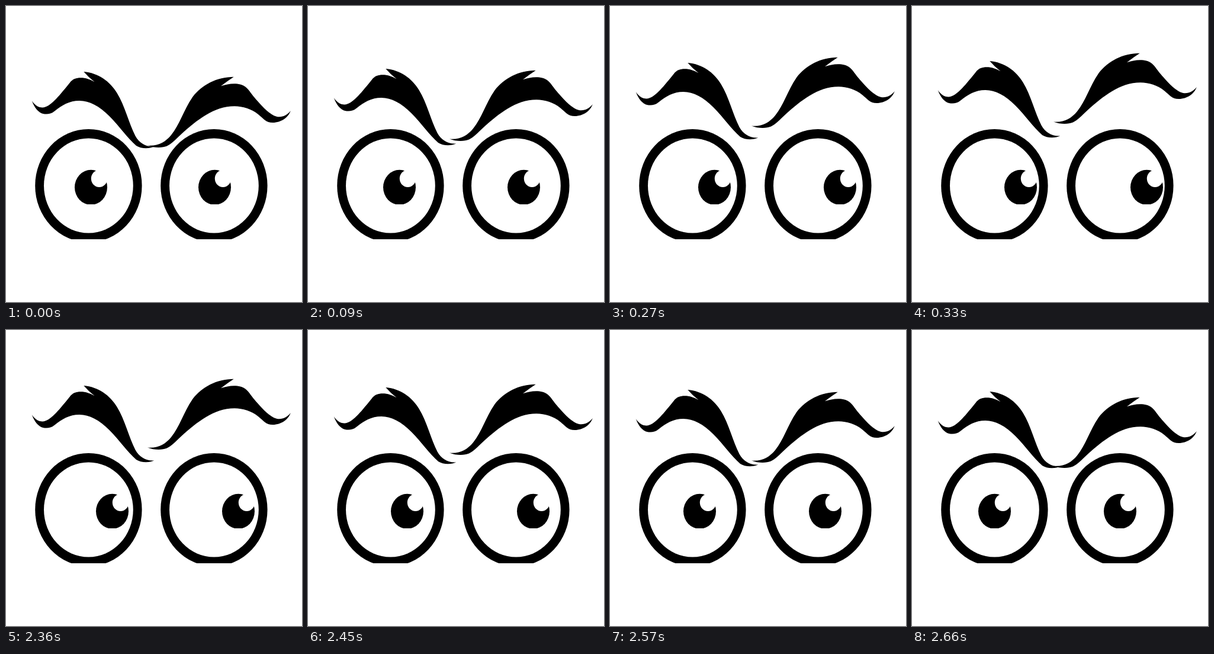
Write an HTML page that moves like this. It is 500 by 500 pixels and loops after 4930 ms.

```html
<!DOCTYPE html>
<html lang="en">
<head>
<meta charset="utf-8">
<title>Shifty eyes</title>
<style>
  html, body { margin: 0; width: 100%; height: 100%; overflow: hidden; background: #fff; }
  svg { display: block; width: 100%; height: 100%; }
</style>
</head>
<body>
<svg viewBox="0 0 500 500">
  <defs>
    <clipPath id="eyeCut"><rect y="200" width="500" height="194"/></clipPath>
    <clipPath id="pupilCut"><rect x="-30" y="270" width="60" height="65"/></clipPath>
    <g id="eye">
      <ellipse cy="303.5" rx="90.2" ry="95.5"/>
      <ellipse cy="303.5" rx="75.4" ry="80" fill="#fff"/>
    </g>
    <g id="pupil" clip-path="url(#pupilCut)">
      <ellipse cy="306.3" rx="27.5" ry="29.5"/>
      <ellipse cx="14" cy="291.5" rx="13.7" ry="14.5" fill="#fff"/>
    </g>
  </defs>
  <rect width="500" height="500" fill="#fff"/>
  <g clip-path="url(#eyeCut)">
    <use href="#eye" x="139.4"/>
    <use href="#eye" x="351.4"/>
  </g>
  <use id="leftPupil" href="#pupil"/>
  <use id="rightPupil" href="#pupil"/>
  <path id="leftBrow" d="M43.7 142C48 149 55 154 62.5 153.5C76.5 152 92.5 130 107.5 112C112.5 105 119 103.3 126 103.3
    C135 103.3 142 106 149.5 110.3Q140 103 131.3 93C155.5 95 175.5 109 187.5 129C201 151 207.5 180 218.5 201.5
    C225 213 236 220.5 250.3 219.5C243 223 228 223.5 220 218C206 206 191.5 185 174.5 168
    C157.5 151 141 142 124 142C107 142 94.5 149.5 81.5 160C75.5 165 68.5 165 62.5 164C54.5 162 47.5 153 43.7 142Z"/>
  <path id="rightBrow" d="M239 195.5C257 197 269 190 279 178C293.5 160 300 136 315 114C331 93 356 80 384.7 79.8
    Q374.5 86.5 363 95.3C376 91 394 88.5 405 97C411 102 414.5 109 420.5 115.5C431 128 446 144.5 458 147
    C467 148.5 475 144 480.8 137C477 148 465 157 450.5 157C439 157 436 151 426 143
    C415 134 400 129.2 386 129.2C351 129.2 322 153 295.5 177C285 187 279 193 272 196.5C264 200 250 200 239 195.5Z"/>
</svg>
<script>
  const LOOP = 4930, STEP = 30, STEPS = 11, RETURN_AT = 2330;

  // Pupils: centre x. Brows: drop below their raised position.
  const start = { leftPupil: 143.5, rightPupil: 352.5, leftBrow: 18, rightBrow: 40 };
  const aside = { leftPupil: 183.5, rightPupil: 396.5, leftBrow: 0, rightBrow: 0 };
  const end = { leftPupil: 139.5, rightPupil: 351.5, leftBrow: 11, rightBrow: 34 };

  const parts = Object.keys(start).map(id => [id, document.getElementById(id)]);

  function draw(t) {
    const back = t >= RETURN_AT;
    const [from, to] = back ? [aside, end] : [start, aside];
    const elapsed = back ? t - RETURN_AT : t;
    const p = Math.min(STEPS, Math.floor(elapsed / STEP)) / STEPS;
    for (const [id, el] of parts) {
      const pos = from[id] + Math.round((to[id] - from[id]) * p);
      el.setAttribute("transform", id.endsWith("Pupil") ? `translate(${pos} 0)` : `translate(0 ${pos})`);
    }
  }

  const t0 = performance.now();
  function tick() {
    draw((performance.now() - t0) % LOOP);
    requestAnimationFrame(tick);
  }
  draw(0);
  requestAnimationFrame(tick);
</script>
</body>
</html>
```
